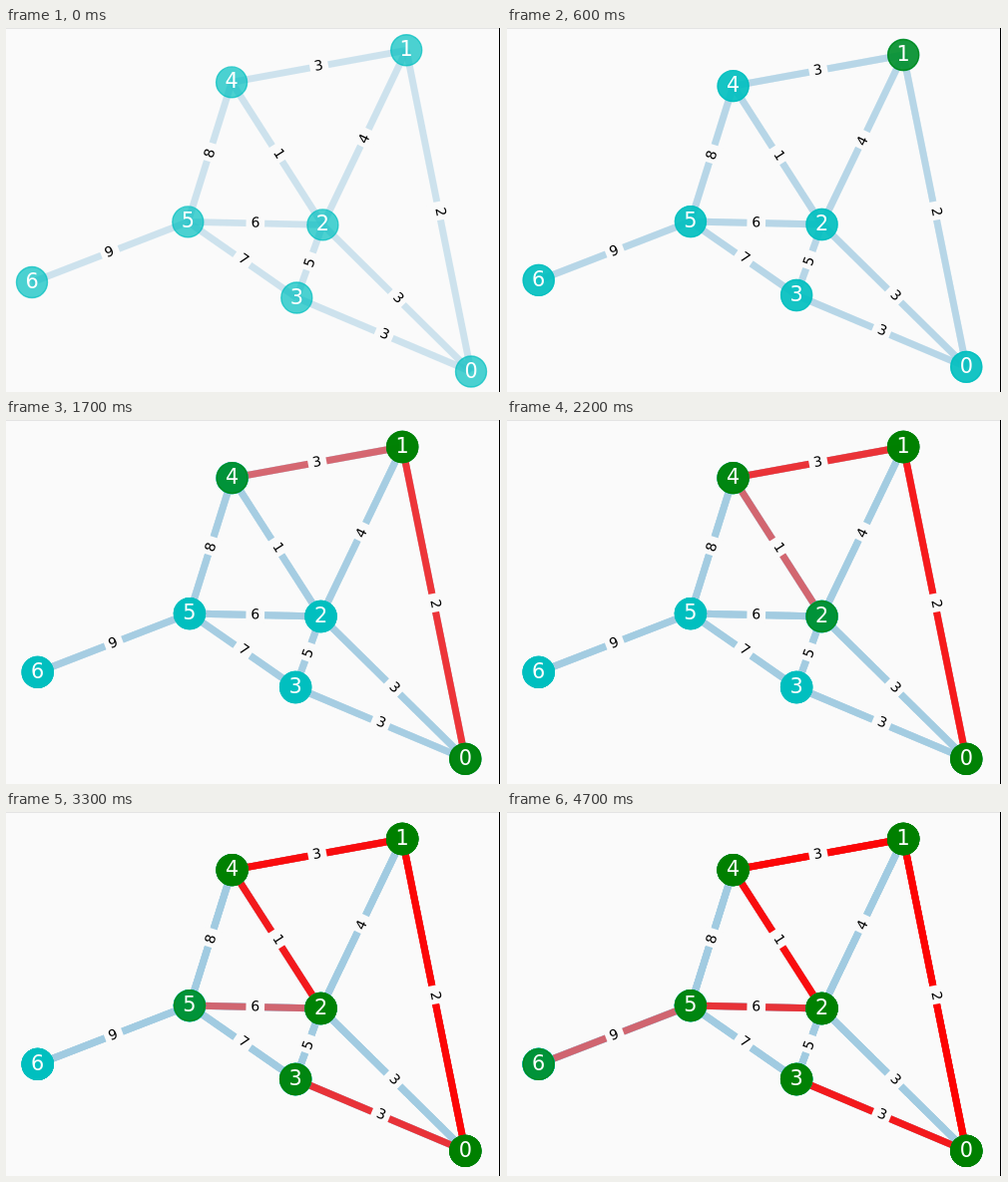
Write an HTML page with a canvas that moves like this. It is 496 px wide and 365 px high and loops after 6100 ms.

```html
<!DOCTYPE html>
<html>
<head>
<meta charset="utf-8">
<style>
  html, body { margin: 0; width: 100%; height: 100%; overflow: hidden; background: #fafafa; }
  canvas { display: block; }
</style>
</head>
<body>
<canvas id="stage" width="496" height="365"></canvas>
<script>
const ctx = document.getElementById('stage').getContext('2d');
const PAPER = '#fafafa';
const holds = [600, 600, 500, 500, 500, 600, 1400, 1400];
const loop = holds.reduce((sum, ms) => sum + ms);

const points = [[466, 344.5], [401.2, 22.3], [317.4, 197.4], [291.3, 270.5], [226.1, 54.4], [182.3, 194.4], [26, 255]];
const edges = [
  [0, 1, 2], [0, 2, 3], [0, 3, 3], [1, 2, 4], [1, 4, 3], [2, 3, 5],
  [2, 4, 1], [2, 5, 6], [3, 5, 7], [4, 5, 8], [5, 6, 9]
].map(([a, b, weight]) => ({ a, b, weight, joins: Infinity }));

// Prim's algorithm: find the step at which each node and edge joins the tree
function growTree(root) {
  const joins = new Map([[root, 1]]);
  while (joins.size < points.length) {
    let best = { weight: Infinity }, next;
    for (const node of joins.keys())
      for (const edge of edges) {
        if (edge.a !== node && edge.b !== node) continue;
        const other = edge.a + edge.b - node;
        if (!joins.has(other) && edge.weight < best.weight) [best, next] = [edge, other];
      }
    best.joins = joins.size + 1;
    joins.set(next, best.joins);
  }
  return joins;
}
const nodeJoins = growTree(1);

// the view zooms out a little once the first step is taken
function place(step) {
  const zoomX = step ? 0.974 : 1, zoomY = step ? 0.971 : 1;
  return points.map(([x, y]) => [246 + (x - 246) * zoomX, 183.3 + (y - 183.3) * zoomY]);
}

function drawEdge(a, b, color) {
  ctx.strokeStyle = color;
  ctx.beginPath();
  ctx.moveTo(...a);
  ctx.lineTo(...b);
  ctx.stroke();
}

function drawNode([x, y], color) {
  ctx.fillStyle = ctx.strokeStyle = color;
  ctx.beginPath();
  ctx.arc(x, y, 15.5, 0, 7);
  ctx.fill();
  ctx.stroke();
}

function drawWeight(a, b, weight) {
  const [l, r] = a[0] < b[0] ? [a, b] : [b, a];
  const angle = Math.atan2(r[1] - l[1], r[0] - l[0]);
  const lean = Math.sin(angle);
  ctx.save();
  ctx.translate((l[0] + r[0]) / 2, (l[1] + r[1]) / 2);
  ctx.rotate(angle);
  ctx.fillStyle = PAPER;
  ctx.beginPath();
  ctx.roundRect(-9.3, -11.5, 18.6, 23, 4.8);
  ctx.fill();
  ctx.fillStyle = '#000';
  ctx.fillText(weight, 1.4 * lean, 3.8 - lean);
  ctx.restore();
}

function draw(step) {
  const pos = place(step);
  ctx.globalAlpha = 1;
  ctx.fillStyle = PAPER;
  ctx.fillRect(0, 0, 496, 365);
  ctx.fillStyle = '#e4e4e4';
  ctx.fillRect(0, 0, 494, 1);
  ctx.fillStyle = '#000';
  ctx.fillRect(494, 0, 1, 365);

  // every step paints another translucent layer over the earlier ones
  ctx.globalAlpha = 0.5;
  ctx.lineWidth = 6.94;
  for (let i = 0; i <= step; i++)
    for (const e of edges) drawEdge(pos[e.a], pos[e.b], i >= e.joins ? '#f00' : '#a1cbe2');

  ctx.globalAlpha = 0.7;
  ctx.lineWidth = 1.39;
  for (let i = 0; i <= step; i++)
    pos.forEach((p, n) => drawNode(p, i >= nodeJoins.get(n) ? '#008000' : '#00bfbf'));

  ctx.globalAlpha = 1;
  ctx.textAlign = 'center';
  ctx.font = '13.9px "DejaVu Sans", sans-serif';
  for (const e of edges) drawWeight(pos[e.a], pos[e.b], e.weight);

  ctx.fillStyle = '#fff';
  ctx.font = '20.8px "DejaVu Sans", sans-serif';
  pos.forEach(([x, y], n) => ctx.fillText(n, x, y + 6));
}

function stepAt(t) {
  let step = 0;
  while (t >= holds[step]) t -= holds[step++];
  return step;
}

const begin = performance.now();
let shown = -1;
function tick() {
  const step = stepAt((performance.now() - begin) % loop);
  if (step !== shown) draw(shown = step);
  requestAnimationFrame(tick);
}
tick();
</script>
</body>
</html>
```
